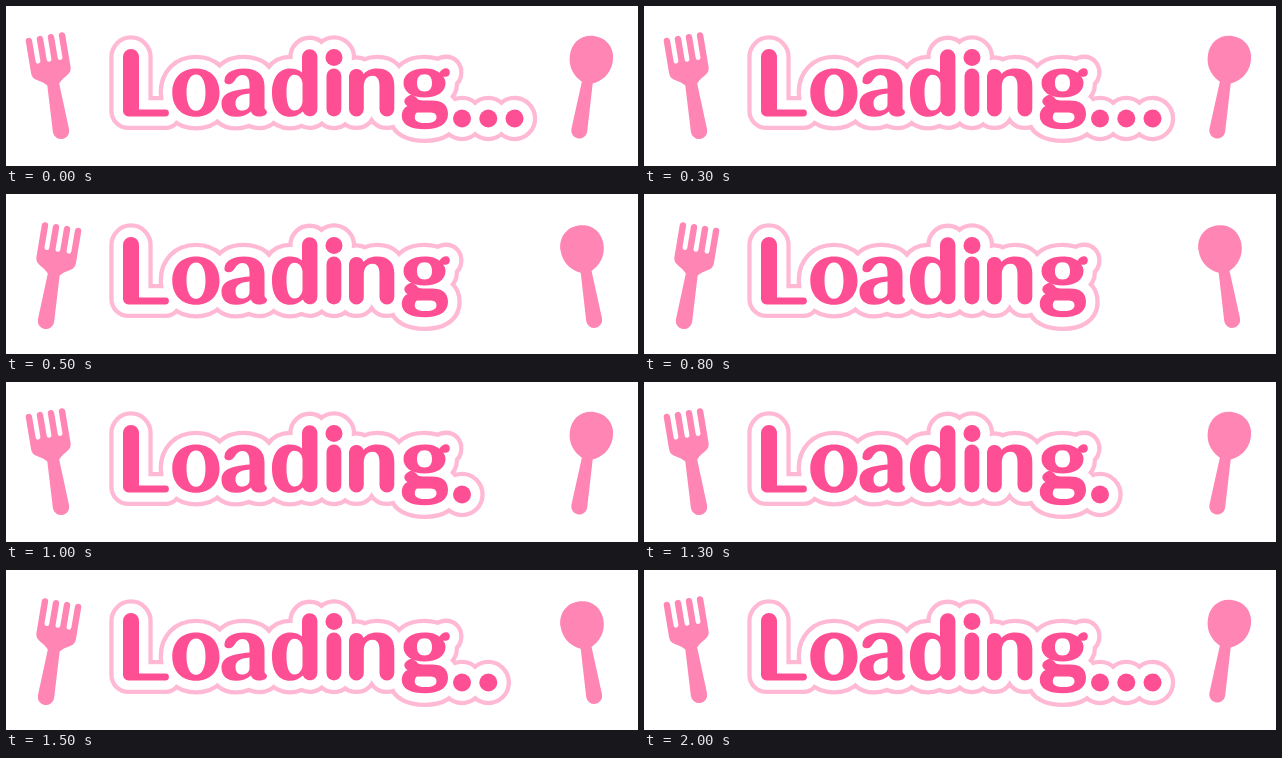
Write an HTML page that moves like this. It is 632 px wide and 160 px high and loops after 2100 ms.

```html
<!DOCTYPE html>
<html lang="en">
<head>
<meta charset="utf-8">
<title>Loading</title>
<style>
  html, body { margin: 0; width: 100%; height: 100%; overflow: hidden; background: #fff; }
  svg { display: block; width: 632px; height: 160px; }
  .ring { fill: #ffb9d4; stroke: #ffb9d4; stroke-width: 27.4; }
  .gap { fill: #fff; stroke: #fff; stroke-width: 18.8; }
  .face { fill: #ff4f94; }
  .cutlery { fill: #ff85b4; }
</style>
</head>
<body>
<svg viewBox="0 0 632 160" role="img" aria-label="Loading...">
  <defs>
    <g id="word" fill-rule="evenodd" stroke-linejoin="round">
      <!-- L -->
      <path d="M117 51a8 8 0 0 1 16 0V103.600H159.500a3.400 3.400 0 0 1 0 6.800H122.500a5.500 5.500 0 0 1-5.500-5.500Z"/>
      <!-- o -->
      <path d="M190 62.500C204.500 62.500 213.500 72 213.500 86.500S204.500 110.800 190 110.800S166.300 101 166.300 86.500S175.500 62.500 190 62.500Z
               M190 68.500C184 68.500 180.500 75.500 180.500 86.500S184 104.800 190 104.800S199.500 97.500 199.500 86.500S196 68.500 190 68.500Z"/>
      <!-- a -->
      <path d="M218.500 74C219 66.500 228 62.500 237.500 62.500C251 62.500 258.500 68.500 258.500 80V101C258.500 104 260.500 103.500 261 106C261 109 257 110.500 253.500 110.500C249 110.500 246 109 245 105.500C241 109 236 110.800 230 110.800C221 110.800 215.500 106 215.500 98C215.500 88 224 84 243.500 82.500V79C243.500 72 241 69 236 69C229.500 69 229 78 223.500 78.300C220 78.300 218 77 218.500 74Z
               M243.500 87.500C234 88.500 229.500 91 229.500 97C229.500 102 232 104.500 236 104.500C240.500 104.500 243.500 102 243.500 98Z"/>
      <!-- d -->
      <path d="M296 66.500V51a7.700 7.700 0 0 1 15.400 0V103a7.500 7.500 0 0 1-14.500 2.500C293 109 289 110.800 284 110.800C272.500 110.800 266 101 266 86.500S273 62.500 284 62.500C289 62.500 293 64 296 66.500Z
               M296.500 77C295.500 71.500 292.500 68.800 288.500 68.800C283 68.800 280.500 75.500 280.500 86.500S283 104.500 288.500 104.500C292.500 104.500 295.500 101.500 296.500 96Z"/>
      <!-- i -->
      <circle cx="328" cy="51.400" r="8.500"/>
      <rect x="320.500" y="62.500" width="14.800" height="48" rx="7.400"/>
      <!-- n -->
      <path d="M343 70a7.500 7.500 0 0 1 14.600-2C361 64 366 62.500 371 62.500C382.500 62.500 388.300 68.500 388.300 79.500V103a7.400 7.400 0 0 1-14.800 0V80C373.500 73 371 69.800 366.500 69.800C361 69.800 357.800 74 357.800 81V103a7.400 7.400 0 0 1-14.800 0Z"/>
      <!-- g -->
      <path d="M418.500 62.500C425.500 62.500 430 64 433.500 66.800C435 64 437.500 62.300 440 62.300C442.500 62.300 443.800 64 443.800 66.500C443.800 70 441 71.500 437 70.500C438.800 72.500 439.500 74.500 439.500 77C439.500 86 431 91.500 418.500 91.500S397.500 86 397.500 77S406 62.500 418.500 62.500Z
               M418.500 68.300C413.500 68.300 411 71.500 411 77S413.500 85.500 418.500 85.500S426 82.500 426 77S423.500 68.300 418.500 68.300Z"/>
      <path d="M406 88.500C397 91 396.500 97 401.500 100C397.500 102 395.800 106 395.800 110C395.800 119 405 123.300 419 123.300C433 123.300 442 118 442 108C442 98.500 436 94.500 426 94.500C418 94.500 411 95 411 92Z
               M411 106.500H423C428 106.500 430.500 107.800 430.500 111C430.500 115 427 117 419.500 117C412 117 408.800 115 408.800 111.500C408.800 109 409.500 107.500 411 106.500Z"/>
      <circle class="dot" cx="456" cy="112.500" r="9"/>
      <circle class="dot" cx="482.300" cy="112.500" r="9"/>
      <circle class="dot" cx="508.500" cy="112.500" r="9"/>
    </g>
  </defs>

  <use href="#word" class="ring"/>
  <use href="#word" class="gap"/>
  <use href="#word" class="face"/>

  <g id="fork" class="cutlery">
    <path d="M-20-48.500a3.200 3.200 0 0 1 6.400 0v21.500a2.400 2.400 0 0 0 4.800 0v-21.500a3.200 3.200 0 0 1 6.400 0v21.500a2.400 2.400 0 0 0 4.800 0v-21.500a3.200 3.200 0 0 1 6.400 0v21.500a2.400 2.400 0 0 0 4.800 0v-21.500a3.200 3.200 0 0 1 6.400 0
             V-16C20-8 11-8 6-1.500L8.200 45.500A8.200 8.200 0 0 1-8.200 45.500L-6-1.500C-11-8-20-8-20-16Z"/>
  </g>
  <g id="spoon" class="cutlery">
    <path d="M0-50.500C13-50.500 21.700-41 21.700-28.500C21.700-15 13.500-7 5.500-3.500L8 45.200A8 8 0 0 1-8 45.200L-5.500-3.500C-13.500-7-21.700-15-21.700-28.500C-21.700-41-13-50.500 0-50.500Z"/>
  </g>
</svg>
<script>
  const LOOP = 2100, BEAT = 500, TILT = 9.5;
  const DOTS = [3, 0, 1, 2, 3];
  const dots = document.querySelectorAll('.dot');
  const fork = document.getElementById('fork');
  const spoon = document.getElementById('spoon');
  const start = performance.now();
  let shown = -1;

  const place = (el, x, y, angle) =>
    el.setAttribute('transform', `translate(${x} ${y}) rotate(${angle})`);

  function show(step) {
    const odd = step % 2;
    const angle = odd ? TILT : -TILT;
    place(fork, 47.5, odd ? 82 : 80, angle);
    place(spoon, 580.7, odd ? 81.3 : 80, -angle);
    dots.forEach((dot, i) => {
      dot.style.display = i < DOTS[step] ? '' : 'none';
    });
  }

  function tick() {
    const step = Math.floor((performance.now() - start) % LOOP / BEAT);
    if (step !== shown) show(shown = step);
    requestAnimationFrame(tick);
  }
  tick();
</script>
</body>
</html>
```
